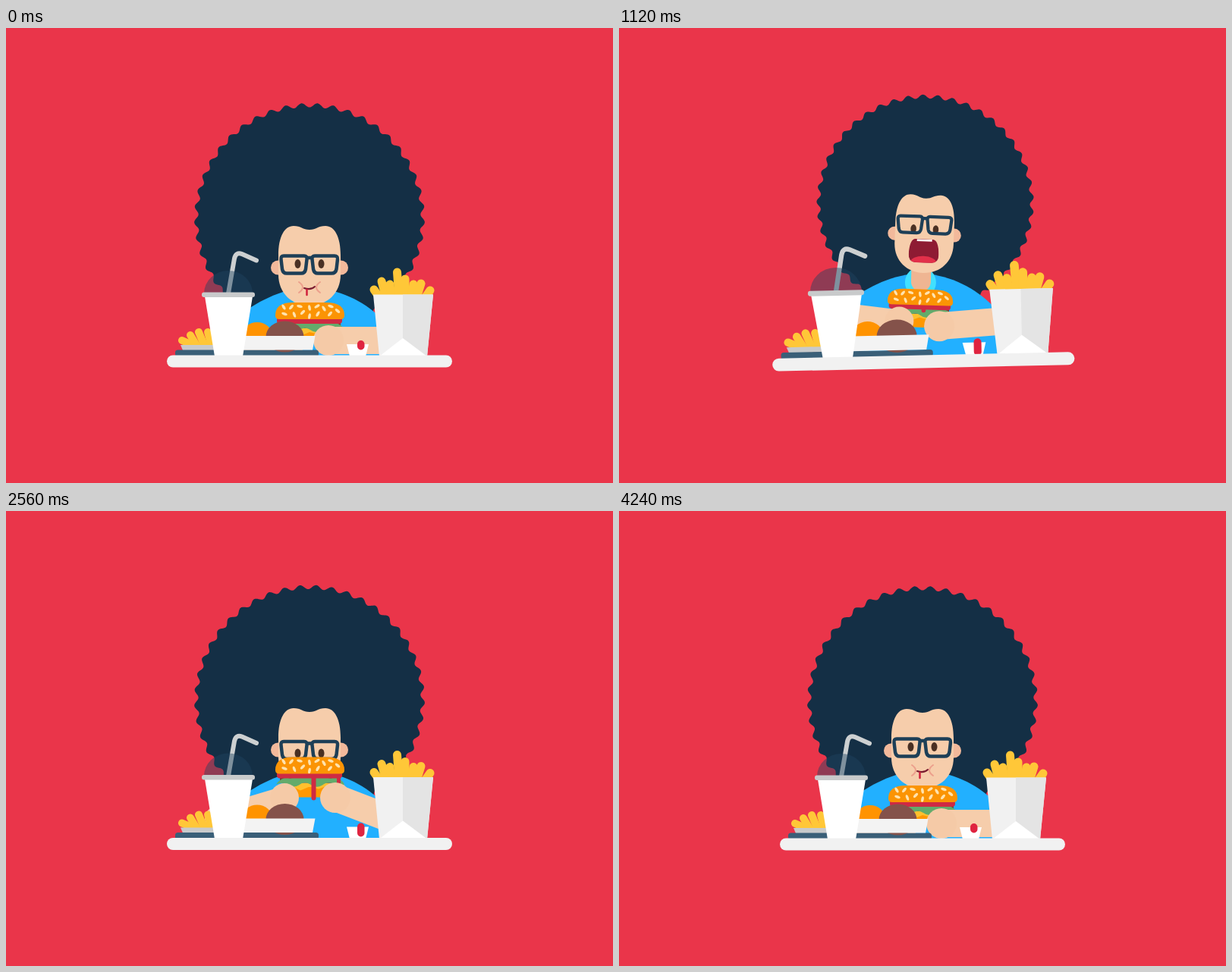
Write an HTML page that moves like this. It is 800 by 600 pixels and loops after 4.28 s.

```html
<!DOCTYPE html>
<html>
<head>
<meta charset="utf-8">
<style>
html, body { margin: 0; width: 100%; height: 100%; overflow: hidden; background: #ea354a; }
svg { display: block; width: 100%; height: 100%; }
</style>
</head>
<body>
<svg viewBox="0 0 800 600">
  <defs>
    <clipPath id="aboveTray"><path d="M0 0H800V439H0z"/></clipPath>
    <clipPath id="mouthClip"><path id="mouthEdge"/></clipPath>
    <clipPath id="lensClip"><path d="M360 298H440V323H360z"/></clipPath>
  </defs>
  <rect width="800" height="600" fill="#ea354a"/>
  <path id="hair" fill="#142f45"/>

  <g clip-path="url(#aboveTray)">
    <g id="body">
      <path d="M400 340C440 342 470 358 493 379L510 480H300L304 379C330 360 360 342 400 340" fill="#22b0ff"/>
      <circle cx="398" cy="352" r="20.5" fill="#41e0ff"/>
      <rect x="385.500" y="311" width="26" height="53" rx="13" fill="#efb592"/>
    </g>
    <g id="face">
      <g fill="#f2b99b"><circle cx="358.500" cy="316" r="9.500"/><circle cx="441.500" cy="316" r="9.500"/></g>
      <path id="skin" fill="#f6cdab"/>
      <g id="smile" fill="none" stroke-linecap="round" stroke-width="2">
        <path d="M386 335Q396 342 386 349M414 335Q404 342 414 349" stroke="#ec9f8c"/>
        <path d="M393 343Q402 346 407 341" stroke="#7a1c30"/>
        <path d="M396.500 345V352" stroke="#d0203c" stroke-width="2.500"/>
      </g>
      <g id="mouth" clip-path="url(#mouthClip)">
        <rect x="370" y="300" width="60" height="80" fill="#8e1b33"/>
        <ellipse id="tongue" cx="400" rx="18" ry="9" fill="#e2304a"/>
        <rect id="teeth" x="390" width="21" fill="#fff"/>
      </g>
      <g id="specs">
        <g clip-path="url(#lensClip)">
          <g id="eyes" fill="#4a3023"><ellipse cx="384.500" cy="313" rx="4" ry="6"/><ellipse cx="415.500" cy="313" rx="4" ry="6"/></g>
        </g>
        <g fill="none" stroke="#1d3f57" stroke-width="4.500">
          <path d="M366 300.500H393Q397 300.500 396.500 305L395 318Q394 323.500 389 323.500H370Q365 323.500 364 318L362.500 305Q362 300.500 366 300.500z"/>
          <path d="M407 300.500H433Q437.500 300.500 437 305L435.500 318Q434.500 323.500 429 323.500H411Q406 323.500 405 318L403.500 305Q403 300.500 407 300.500z"/>
          <path d="M395 303H405"/>
        </g>
      </g>
    </g>
    <g id="burger">
      <rect x="362" y="401" width="77" height="14" rx="6" fill="#ff9800"/>
      <path d="M368 396H434L412 404 400 401 388 406z" fill="#ffc02e"/>
      <rect x="361" y="386" width="80" height="10" rx="4" fill="#6d4038"/>
      <path d="M356 398Q364 387 374 390Q400 385 428 390Q440 387 446 398Q440 403 433 397Q424 393 417 399Q409 404 401 398Q393 393 386 399Q378 404 370 397Q363 395 356 398" fill="#63ab6b"/>
      <rect x="357" y="381" width="86" height="9" rx="4" fill="#cf2a43"/>
      <g fill="#cf2a43"><rect id="dripA" x="402.500" y="386" width="6" rx="3"/><rect id="dripB" x="436" y="386" width="5" rx="2.500"/></g>
      <path d="M355 379Q355 362 378 362H422Q446 362 446 379Q446 384 441 384H360Q355 384 355 379" fill="#fb9404"/>
      <g id="seeds" fill="#ffe3ae"></g>
    </g>
    <g stroke="#f6cdab" stroke-linecap="round"><path id="armL" stroke-width="30"/><path id="armR" stroke-width="36"/></g>
    <g fill="#f5caa7"><circle id="handL" r="19"/><circle id="handR" r="20"/></g>
  </g>

  <g id="meal">
    <g id="fries" stroke="#ffc738" stroke-linecap="round"></g>
    <path d="M230 418H280L276 425H233z" fill="#c8cacb"/>
    <rect x="223" y="424.500" width="189" height="9" rx="3.500" fill="#3a5f78"/>
    <ellipse cx="331" cy="406" rx="20" ry="18" fill="#ff9300"/>
    <ellipse cx="367.500" cy="407" rx="25" ry="20.500" fill="#84524a"/>
    <path d="M300 406H407.500L404 424.500H300z" fill="#f3f3f3"/>
    <path d="M293 350L301 304Q303 295 311 298L330 306.500" fill="none" stroke="#cdd0d1" stroke-width="6" stroke-linecap="round"/>
    <path d="M261 350A32 30 0 0 1 325 350z" fill="#1f445f" opacity=".45"/>
    <path d="M262 354H325L312 433H275z" fill="#fff"/>
    <rect x="258" y="348.500" width="70" height="6.500" rx="3" fill="#c8cacb"/>
    <path d="M449 417H478L474 433H453z" fill="#fff"/>
    <rect id="sauce" x="463" y="412" width="9.500" rx="4.700" fill="#df2440"/>
    <path d="M484 351.500H563L555 433H492z" fill="#f1f1f1"/>
    <path d="M523 351.500H563L555 433H523z" fill="#e4e4e4"/>
    <path d="M492 433L523 409 555 433z" fill="#fff"/>
    <rect x="212" y="431.500" width="376" height="16" rx="8" fill="#f1f1f1"/>
  </g>
</svg>
<script>
const LOOP = 4280;
const $ = id => document.getElementById(id);
const set = (id, attrs) => { for (const k in attrs) $(id).setAttribute(k, attrs[k]); };

// Scalloped hair outline around (0,0)
const BUMPS = 45, STEPS = BUMPS * 16;
let outline = '';
for (let i = 0; i < STEPS; i++) {
  const a = i / STEPS * 2 * Math.PI;
  const r = 149.2 - 2.8 * Math.cos(BUMPS * a);
  outline += `${i ? 'L' : 'M'}${(r * Math.sin(a)).toFixed(2)} ${(-r * Math.cos(a)).toFixed(2)}`;
}
set('hair', { d: outline + 'z' });

const seeds = [[366, 368, 60], [367, 377, 20], [376, 368, -50], [380, 378, 70], [387, 367, 15], [391, 375, -45],
  [400, 369, 80], [400, 380, 100], [410, 367, -30], [411, 377, 120], [419, 370, 60], [428, 367, 20], [427, 377, -50], [437, 373, 40]];
$('seeds').innerHTML = seeds.map(([x, y, a]) =>
  `<ellipse rx="3.900" ry="1.800" transform="translate(${x} ${y}) rotate(${a})"/>`).join('');

const fry = w => ([x, y, x2, y2]) => `<path d="M${x} ${y}L${x2} ${y2}" stroke-width="${w}"/>`;
$('fries').innerHTML =
  [[232, 412, 250, 420], [243, 405, 252, 420], [254, 401, 262, 420], [266, 401, 271, 420]].map(fry(10)).join('') +
  [[485, 345, 492, 355], [495, 334, 501, 356], [506, 338, 508, 356], [515.5, 322, 518, 356],
   [526, 331, 526, 356], [537, 338, 534, 356], [547, 337, 541, 356], [559, 346, 552, 356]].map(fry(11)).join('');

// Placements are [x, y, scale, rotation]; arms are [handX, handY, elbowX, elbowY]
const rest = {
  hair: [400, 251, 1, 0], face: [400, 313, 1, 0], burger: [400, 362, 1, 0], body: [400, 402, 1, 0], meal: [400, 440, 1, 0],
  specs: 0, eyes: -2, mouth: [341, 0, 0], chin: 366, drip: 0, sauce: 12.5,
  left: [372, 424, 290, 418], right: [425, 412, 510, 412]
};
const shout = {
  hair: [406.5, 234, 0.912, 5.5], face: [404, 257, 0.92, 4.5], burger: [394.5, 350.5, 0.92, 3.5],
  body: [397, 376, 1, 2.5], meal: [402, 440.5, 1.09, -1.9],
  specs: -14, eyes: 5, mouth: [319, 38, 1.5], chin: 371, drip: 0, sauce: 22,
  left: [368, 390, 302, 364], right: [417, 400, 515, 382]
};
const lift = {
  hair: [398, 225, 1, -2.5], face: [400, 293, 1, -2.5], burger: [402, 333, 1, -1.5],
  body: [400, 398, 1, 0], meal: [400, 440.5, 1, 0],
  specs: 0, eyes: 5, mouth: [330, 22, 6], chin: 367, drip: 24, sauce: 20,
  left: [372, 380, 278, 403], right: [432, 380, 512, 393]
};
const bite = {
  ...rest, hair: [400, 249.5, 1, -0.7], face: [400, 312, 1, 0], burger: [400, 324.5, 1, 0], meal: [400, 439.5, 1, 0],
  specs: 4.5, eyes: 3, mouth: [335, 10, 3], drip: 33, sauce: 18,
  left: [367, 378, 277, 405], right: [434, 378, 512, 408]
};
const pull = tilt => ({
  ...bite, hair: [400 + tilt, 230, 1, tilt], face: [400 + tilt / 3, 294, 1, tilt],
  burger: [400 - tilt / 1.5, 317, 1, tilt / 2], left: [360, 367, 274, 402], right: [434, 369, 512, 401]
});
const firstBite = { ...bite, drip: 29, sauce: 19.5 };
const chew = {
  ...rest, hair: [400, 251.5, 1, 0], face: [400, 313.8, 1, 0], burger: [400, 351.5, 1, 0], meal: [400, 440.5, 1, 0],
  specs: 1.5, drip: 33, sauce: 13.5, left: [365, 402, 285, 402], right: [427, 404, 510, 407]
};

const timeline = [
  [0, rest], [60, rest], [460, shout], [960, shout], [1370, lift], [1640, lift],
  [1830, firstBite], [1920, firstBite], [2240, pull(3)], [2300, pull(3)], [2490, bite], [2620, bite],
  [2820, pull(-3)], [2900, pull(-3)], [3110, bite], [3180, bite], [3420, chew], [3480, chew], [4000, rest], [LOOP, rest]
];

const mix = (a, b, u) => Array.isArray(a) ? a.map((v, i) => mix(v, b[i], u)) : a + (b - a) * u;
function poseAt(t) {
  const i = timeline.findIndex(k => k[0] > t);
  const [t0, a] = timeline[i - 1], [t1, b] = timeline[i];
  const u = (t - t0) / (t1 - t0), eased = u * u * (3 - 2 * u);
  const pose = {};
  for (const k in a) pose[k] = mix(a[k], b[k], eased);
  return pose;
}

const place = (id, [x, y, s, r], ox, oy) =>
  set(id, { transform: `translate(${x} ${y}) rotate(${r}) scale(${s}) translate(${-ox} ${-oy})` });
const shift = (id, y) => set(id, { transform: `translate(0 ${y})` });
function arm(side, [x, y, ex, ey]) {
  set('arm' + side, { d: `M${x} ${y}L${ex} ${ey}` });
  set('hand' + side, { cx: x, cy: y });
}

function draw(t) {
  const p = poseAt(t);
  place('hair', p.hair, 0, 0);
  place('face', p.face, 400, 313);
  place('burger', p.burger, 400, 362);
  place('body', p.body, 400, 400);
  place('meal', p.meal, 400, 440);
  shift('specs', p.specs);
  shift('eyes', p.eyes);
  arm('L', p.left);
  arm('R', p.right);

  const c = p.chin;
  set('skin', { d: `M359 300C359 275 367 261 379 261C389 261 391 266 400 266C409 266 411 261 421 261C433 261 441 275 441 300V${c - 41}C441 ${c - 16} 423 ${c} 400 ${c}C377 ${c} 359 ${c - 16} 359 ${c - 41}z` });

  const [top, h, teeth] = p.mouth, end = top + h, low = top + h * 0.65;
  set('mouthEdge', { d: `M388 ${top}H412Q420 ${top} 421 ${low}Q421 ${end} 411 ${end}H389Q379 ${end} 379 ${low}Q380 ${top} 388 ${top}` });
  set('tongue', { cy: end });
  set('teeth', { y: top, height: teeth });
  set('smile', { opacity: h < 3 ? 1 : 0 });
  set('mouth', { opacity: h < 3 ? 0 : 1 });

  set('dripA', { height: p.drip });
  set('dripB', { height: Math.max(0, p.drip - 20) });
  set('sauce', { height: p.sauce });
}

const start = performance.now();
function tick() {
  draw((performance.now() - start) % LOOP);
  requestAnimationFrame(tick);
}
tick();
</script>
</body>
</html>
```
